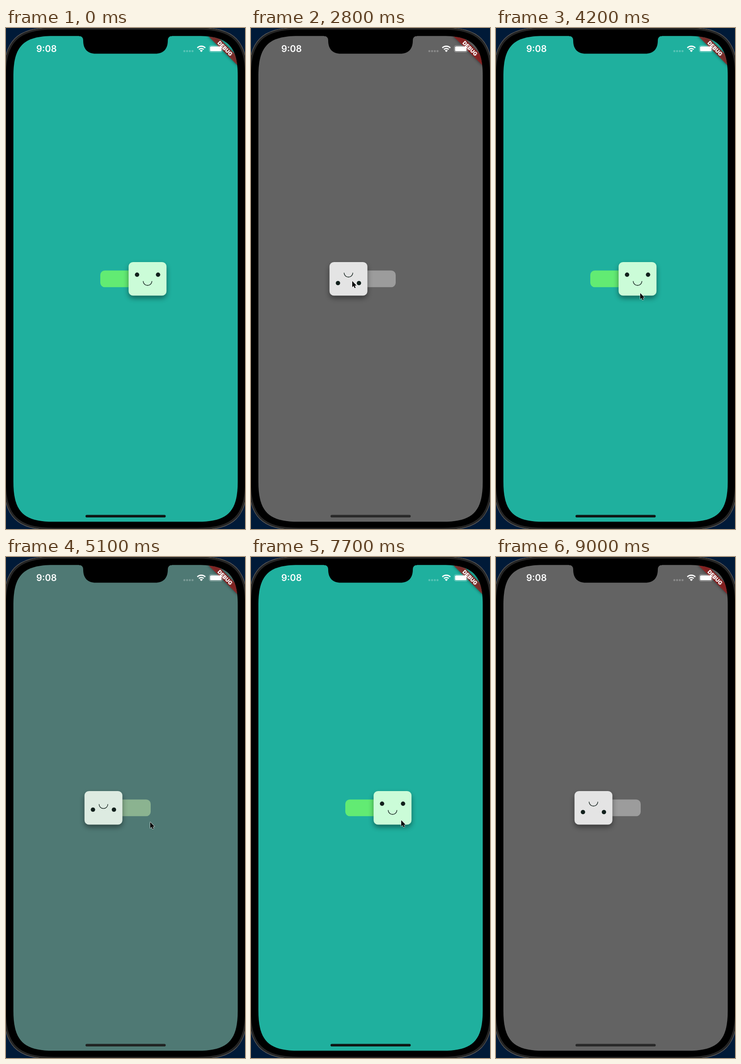
Animation of 517 by 1083 pixels, one loop 9.9 s. Source, as an HTML page:

```html
<!DOCTYPE html>
<html lang="en">
<head>
<meta charset="utf-8">
<title>Mood switch</title>
<style>
  html, body { margin: 0; width: 100%; height: 100%; overflow: hidden; background: #001a38; }
  svg { display: block; width: 100%; height: 100%; }
  text { font-family: Inter, "Liberation Sans", sans-serif; fill: #fff; }
</style>
</head>
<body>
<svg viewBox="0 0 517 1083" preserveAspectRatio="none">
  <defs>
    <clipPath id="clip"><path id="glass"/></clipPath>
    <filter id="soft" x="-50%" y="-50%" width="200%" height="200%"><feGaussianBlur stdDeviation="6"/></filter>
    <filter id="glow" x="-20%" y="-100%" width="140%" height="300%"><feGaussianBlur stdDeviation="3.4"/></filter>
  </defs>

  <path id="shell" fill="#000" stroke="#6b6864" stroke-width="1.2"/>
  <path id="rim" fill="#000" stroke="#252525" stroke-width="4"/>

  <g clip-path="url(#clip)">
    <rect id="bg" x="15" y="16" width="487" height="1052"/>
    <rect id="track" x="204" y="524.3" width="109" height="36" rx="9.5"/>
    <g id="knob">
      <rect x="-41" y="512" width="82" height="72" rx="10" fill="#000" opacity=".42" filter="url(#soft)"/>
      <rect id="face" x="-41" y="506" width="82" height="72.5" rx="9.5"/>
      <g id="eyes" fill="#12201c">
        <circle cx="-22.7" r="4.7"/>
        <circle cx="22.7" r="4.7"/>
      </g>
      <path id="mouth" d="M-9.5 0A9.5 9.5 0 0 0 9.5 0" fill="none" stroke="#12201c" stroke-width="1.3"/>
    </g>
    <g transform="translate(501 17) rotate(45)">
      <rect x="-45.3" y="31.7" width="90.6" height="13.6" fill="#000" opacity=".5" filter="url(#glow)"/>
      <rect x="-45.3" y="31.7" width="90.6" height="13.6" fill="#000" opacity=".2"/>
      <rect x="-45.3" y="31.7" width="90.6" height="13.6" fill="#b71c1c" opacity=".627"/>
      <text y="42.7" font-size="11.5" font-weight="900" text-anchor="middle">DEBUG</text>
    </g>
    <rect id="home" x="172" y="1052.4" width="173.5" height="5.6" rx="2.8"/>
  </g>

  <path d="M158 16H359V17.5Q350 17.5 350 27C350 46 340 55.5 323 55.5H194C177 55.5 167 46 167 27Q167 17.5 158 17.5Z"/>

  <text x="65.5" y="52" font-size="19.6" font-weight="600">9:08</text>
  <g fill="#fff">
    <g opacity=".25">
      <circle cx="385.8" cy="50" r="2.2"/><circle cx="391.7" cy="50" r="2.2"/>
      <circle cx="397.6" cy="50" r="2.2"/><circle cx="403.5" cy="50" r="2.2"/>
    </g>
    <path d="M413.9 43A12 12 0 0 1 431.1 43M417.3 46.4A7.3 7.3 0 0 1 427.7 46.4" fill="none" stroke="#fff" stroke-width="2.6"/>
    <path d="M422.5 52L419.3 48.8A4.5 4.5 0 0 1 425.7 48.8Z"/>
    <rect x="439.8" y="38" width="28.6" height="14" rx="4" fill="none" stroke="#fff" stroke-opacity=".45" stroke-width="1.1"/>
    <rect x="441.4" y="39.7" width="25" height="10.6" rx="2.6"/>
  </g>

  <path id="cursor" d="M0 0V13.2L3 10.5L5.1 15.2L7.4 14.2L5.3 9.7H9.3Z" stroke="#fff" stroke-width="1.1" stroke-linejoin="round" paint-order="stroke"/>
</svg>
<script>
const LOOP = 9900, STEP = 100;
const SLIDE = 500, FADE = 600;
const RIGHT = 306.2, LEFT = 210.8;

// start of each toggle; they alternate off / on
const taps = [1100, 2850, 4250, 6200, 7850];

// pointer stops: time, x, y
const stops = [
  [650, 430, 1090], [1050, 304, 561], [1700, 304, 561], [2600, 219, 547],
  [2950, 219, 547], [4000, 312, 573], [5500, 312, 573], [6100, 260, 716],
  [6250, 260, 716], [6600, 260, 742], [6800, 260, 742], [7650, 325, 569],
  [8150, 325, 569], [8700, 530, 640]
];

// happy colour, sad colour
const paint = {
  bg: [[31, 176, 158], [99, 99, 99]],
  track: [[98, 235, 115], [156, 156, 156]],
  face: [[203, 252, 216], [228, 228, 228]],
  home: [[14, 22, 20], [41, 41, 41]]
};

const $ = id => document.getElementById(id);
const mix = (a, b, p) => a + (b - a) * p;
const clamp = p => Math.min(1, Math.max(0, p));
const ease = p => p < .5 ? 4 * p ** 3 : 1 - 4 * (1 - p) ** 3;

// rounded box with continuous corners: reach l, control distance c
function squircle(x, y, r, b, l, c) {
  return `M${x} ${y + l}C${x} ${y + c} ${x + c} ${y} ${x + l} ${y}H${r - l}` +
    `C${r - c} ${y} ${r} ${y + c} ${r} ${y + l}V${b - l}` +
    `C${r} ${b - c} ${r - c} ${b} ${r - l} ${b}H${x + l}` +
    `C${x + c} ${b} ${x} ${b - c} ${x} ${b - l}Z`;
}
$('glass').setAttribute('d', squircle(16, 17.3, 501.3, 1067.3, 86, 22));
$('shell').setAttribute('d', squircle(-5, -1, 522, 1085, 108, 28));
$('rim').setAttribute('d', squircle(-2.4, 1.6, 519.4, 1082.4, 106, 27));

// amount of "off" after a delay within each toggle
function level(t, delay, span) {
  let v = 0;
  taps.forEach((start, i) => {
    const p = ease(clamp((t - start - delay) / span));
    v += i % 2 ? -p : p;
  });
  return v;
}

function pointer(t) {
  const i = stops.findIndex(s => s[0] > t);
  if (i < 1) return null;
  const [t0, x0, y0] = stops[i - 1], [t1, x1, y1] = stops[i];
  const p = (t - t0) / (t1 - t0), q = p * p * (3 - 2 * p);
  return [mix(x0, x1, q), mix(y0, y1, q)];
}

const move = (id, x, y) => $(id).setAttribute('transform', `translate(${x} ${y})`);

function draw(t) {
  const mood = level(t, SLIDE, FADE);
  move('knob', mix(RIGHT, LEFT, level(t, 0, SLIDE)), 0);
  move('eyes', 0, mix(533.3, 551.4, mood));
  move('mouth', 0, mix(547, 529, mood));
  for (const id in paint) {
    const [on, off] = paint[id];
    $(id).setAttribute('fill', `rgb(${on.map((c, i) => Math.round(mix(c, off[i], mood)))})`);
  }
  const at = pointer(t);
  $('cursor').style.display = at ? '' : 'none';
  if (at) move('cursor', ...at);
}

const begin = performance.now();
function tick() {
  const t = (performance.now() - begin) % LOOP;
  draw(Math.floor(t / STEP) * STEP);
  requestAnimationFrame(tick);
}
tick();
</script>
</body>
</html>
```
